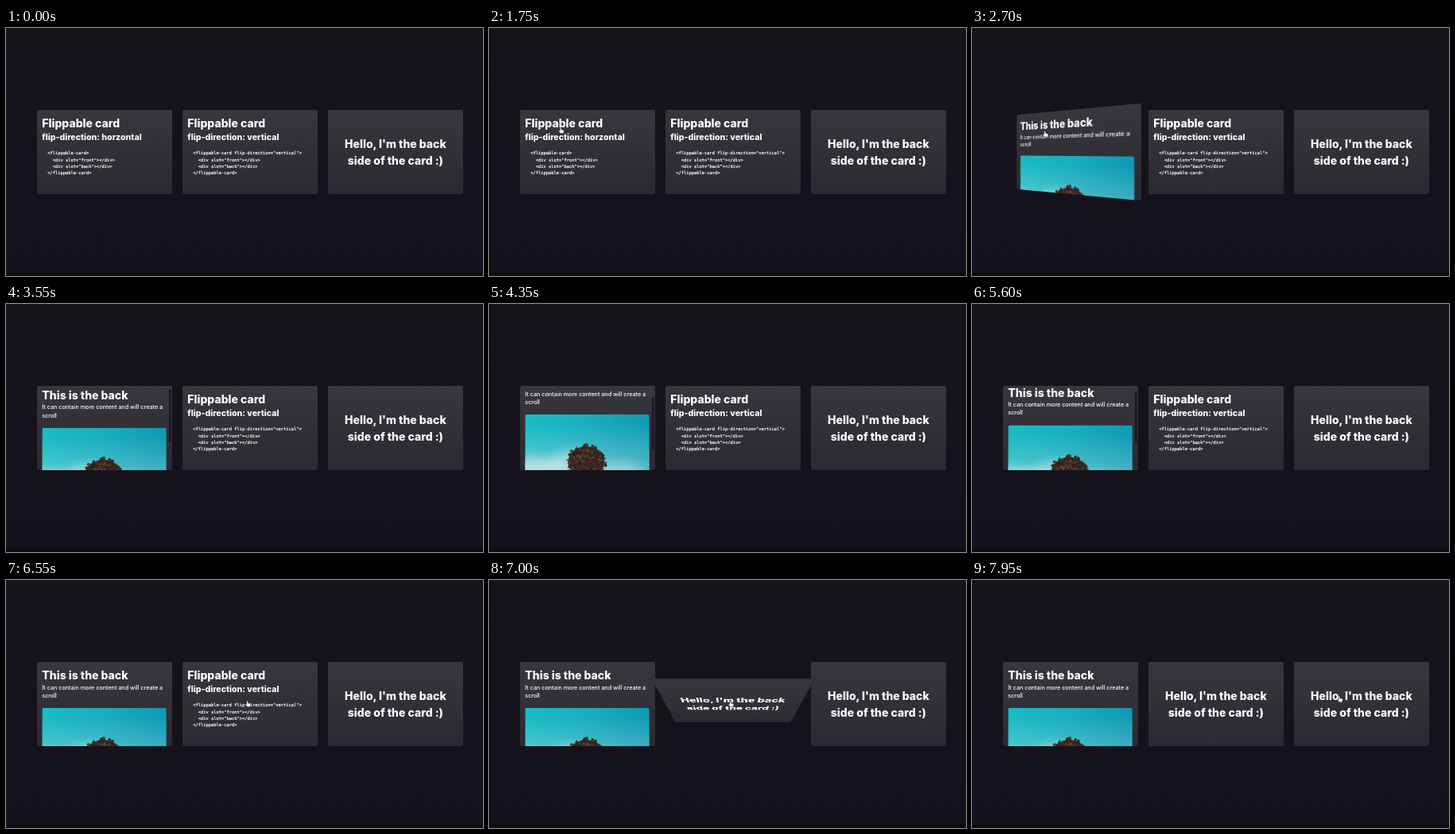
Recreate the animation shown at these times as an HTML page. Size 600 px wide and 312 px high, loop 8000 ms.

```html
<!DOCTYPE html>
<html lang="en">
<head>
<meta charset="utf-8">
<title>Flippable cards</title>
<style>
  html, body { margin: 0; width: 100%; height: 100%; overflow: hidden; background: #16121c; }
  #stage { position: relative; width: 600px; height: 312px; overflow: hidden;
    background: linear-gradient(#17131a, #16121d 97.8%, #0f0a13 98.8%); }
  .card { position: absolute; top: 102.8px; width: 169.8px; height: 106.4px; z-index: 1; }
  .card.under { z-index: 0; }
  .face { position: absolute; inset: 0; overflow: hidden; border-radius: 2.2px;
    background: linear-gradient(#39363d, #2b2931); backface-visibility: hidden; }
  svg { position: absolute; left: 0; top: 0; overflow: visible; }
  text { fill: #fff; font-family: Inter, "Open Sans", sans-serif; }
  .title { font-size: 14px; font-weight: 800; }
  .sub { font-size: 10.6px; font-weight: 800; }
  .body { font-size: 7.2px; font-weight: 500; }
  .code { font: 5.42px "DejaVu Sans Mono", monospace; stroke: #fff; stroke-width: .18; }
  .middle { text-anchor: middle; }
  #cursor { z-index: 2; }
</style>
</head>
<body>
<div id="stage"></div>
<script>
const LOOP = 8000;
const FLIP_TIME = 800;
const PERSPECTIVE = 270;
const CARD = { left: 38.8, pitch: 183.2, width: 169.8, height: 106.4 };

const stage = document.getElementById('stage');
const clamp = v => Math.min(1, Math.max(0, v));

const text = (cls, x, y, content) =>
  `<text class="${cls}" x="${x}" y="${y}">${content.replace(/</g, '&lt;')}</text>`;
const svg = content => `<svg width="${CARD.width}" height="${CARD.height}">${content}</svg>`;

function frontMarkup(direction, attribute) {
  const code = [
    [0, `<flippable-card${attribute}>`],
    [6.5, '<div slot="front"></div>'],
    [6.5, '<div slot="back"></div>'],
    [0, '</flippable-card>']
  ];
  return svg(
    text('title', 6.3, 22.2, 'Flippable card') +
    text('sub', 6.3, 38.4, `flip-direction: ${direction}`) +
    code.map(([indent, line], i) => text('code', 13.2 + indent, 56.4 + i * 8.2, line)).join('')
  );
}

const greeting = svg(
  text('title middle', 84.9, 48.4, "Hello, I'm the back") +
  text('title middle', 84.9, 68.6, 'side of the card :)')
);

function random(seed) {
  return () => (seed = seed * 16807 % 2147483647) / 2147483647;
}

function treeMarkup() {
  const next = random(77);
  const shades = ['#2b1f1d', '#3e2a24', '#53372b', '#35251f', '#644433'];
  let leaves = '';
  for (let i = 0; i < 200; i++) {
    const angle = next() * Math.PI * 2;
    const reach = Math.sqrt(next());
    const x = 77 + Math.cos(angle) * reach * 25;
    const y = 60 + Math.sin(angle) * reach * 22;
    const shade = shades[Math.floor(next() * shades.length)];
    leaves += `<circle cx="${x.toFixed(1)}" cy="${y.toFixed(1)}" r="${(.7 + next() * 1.4).toFixed(1)}" fill="${shade}"/>`;
  }
  return `<path d="M74 72h6l1 28h-9z" fill="#2a201d"/>
    <ellipse cx="77" cy="60" rx="23" ry="20" fill="#38271f"/>${leaves}
    <path d="M0 99q40-5 78-4t78 3v6H0z" fill="#2c2a25"/>`;
}

const skyMarkup = `
  <rect width="156.4" height="104" fill="url(#sky)"/>
  <rect width="156.4" height="104" fill="url(#haze)"/>
  <g filter="url(#soft)" fill="#d3e6e6">
    <ellipse cx="12" cy="68" rx="42" ry="14" opacity=".75"/>
    <ellipse cx="62" cy="60" rx="32" ry="15" opacity=".55"/>
    <ellipse cx="112" cy="72" rx="36" ry="12" opacity=".45"/>
  </g>`;

const backMarkup = svg(`
  <defs>
    <linearGradient id="sky">
      <stop stop-color="#19bcc6"/><stop offset=".5" stop-color="#18aebf"/><stop offset="1" stop-color="#0f99b4"/>
    </linearGradient>
    <linearGradient id="haze" x2="0" y2="1">
      <stop offset=".1" stop-color="#a9dcdc" stop-opacity="0"/><stop offset="1" stop-color="#a9dcdc" stop-opacity=".75"/>
    </linearGradient>
    <filter id="soft" x="-30%" y="-60%" width="160%" height="220%"><feGaussianBlur stdDeviation="6"/></filter>
    <clipPath id="photo"><rect width="156.4" height="104" rx="2.2"/></clipPath>
  </defs>
  <g id="content">
    ${text('title', 6.3, 22.2, 'This is the back')}
    ${text('body', 6.3, 34.7, 'It can contain more content and will create a')}
    ${text('body', 6.3, 44.9, 'scroll')}
    <g transform="translate(6.4 58)" clip-path="url(#photo)">${skyMarkup}${treeMarkup()}</g>
  </g>
  <rect id="thumb" x="166" width="2.6" height="66" rx="1.3" fill="#19181d"/>`);

function addCard(index, faces, under) {
  const card = document.createElement('div');
  card.className = under ? 'card under' : 'card';
  card.style.left = CARD.left + index * CARD.pitch + 'px';
  card.innerHTML = faces.map(face => `<div class="face">${face}</div>`).join('');
  stage.append(card);
  return [...card.children];
}

const flips = [
  { faces: addCard(0, [frontMarkup('horzontal', ''), backMarkup]), axis: 'Y', start: 2250 },
  { faces: addCard(1, [frontMarkup('vertical', ' flip-direction="vertical"'), greeting], true), axis: 'X', start: 6690 }
];
addCard(2, [greeting]);

stage.insertAdjacentHTML('beforeend', `<svg id="cursor" width="600" height="312">
  <path id="arrow" d="M0 0v6.6l1.5-1.4 1.1 2.4 1.1-.5-1.1-2.3h2z" fill="#000" stroke="#ddd" stroke-width=".5"/>
  <path id="hand" d="M-.8 .5q.8-1 1.6 0v2.3l2.8.6q.9.3.7 1.3l-.6 2.8h-4l-2.2-3q.2-1.1 1.7 0z"
    fill="#fff" stroke="#222" stroke-width=".45"/>
</svg>`);

const content = document.getElementById('content');
const thumb = document.getElementById('thumb');
const arrow = document.getElementById('arrow');
const hand = document.getElementById('hand');

// CSS "ease": cubic-bezier(.25, .1, .25, 1), solved by bisection.
function ease(x) {
  if (x <= 0 || x >= 1) return clamp(x);
  let low = 0, high = 1;
  for (let i = 0; i < 24; i++) {
    const u = (low + high) / 2;
    if (.75 * u * (1 - u) + u ** 3 < x) low = u; else high = u;
  }
  const u = low, v = 1 - u;
  return .3 * u * v * v + 3 * u * u * v + u ** 3;
}

// Keys are [time, ...values], joined by straight lines.
function track(keys, t) {
  const i = keys.findIndex(key => key[0] > t);
  if (i === 0) return keys[0].slice(1);
  if (i < 0) return keys[keys.length - 1].slice(1);
  const a = keys[i - 1], b = keys[i];
  const k = (t - a[0]) / (b[0] - a[0]);
  return a.slice(1).map((v, n) => v + (b[n + 1] - v) * k);
}

const scrollKeys = [[3300, 0], [4350, 22], [4900, 64], [5100, 64], [5600, 8.5], [5750, 0]];
const thumbKeys = [[3200, 0], [3350, 1], [6000, 1], [6250, 0]];
const cursorKeys = [
  [1100, 1, 56], [1250, 19.5, 65], [1550, 19.5, 65], [1750, 90, 125], [1900, 91.5, 129.5],
  [2900, 91.5, 129.5], [3100, 122, 185], [5850, 122, 185], [6250, 303.5, 152],
  [7550, 303.5, 152], [7900, 462, 146]
];

function drawCursor(t) {
  const visible = t >= 1100 && (t < 3050 || t >= 5850);
  const [x, y] = track(cursorKeys, t);
  const offset = x - CARD.left;
  const overCard = offset > 0 && offset % CARD.pitch < CARD.width;
  for (const shape of [arrow, hand]) {
    shape.setAttribute('transform', `translate(${x} ${y})`);
    shape.style.display = visible && (shape === hand) === overCard ? '' : 'none';
  }
}

function draw(t) {
  for (const { faces, axis, start } of flips) {
    const angle = 180 * ease((t - start) / FLIP_TIME);
    faces.forEach((face, side) => {
      const turn = (angle + side * 180) % 360;
      face.style.transform = turn ? `perspective(${PERSPECTIVE}px) rotate${axis}(${turn}deg)` : 'none';
      face.style.visibility = (angle < 90) === (side === 0) ? 'visible' : 'hidden';
    });
  }
  const [scroll] = track(scrollKeys, t);
  content.setAttribute('transform', `translate(0 ${-scroll})`);
  thumb.setAttribute('y', 1 + scroll * .62);
  thumb.setAttribute('opacity', track(thumbKeys, t)[0]);
  drawCursor(t);
}

const began = performance.now();
function tick() {
  draw((performance.now() - began) % LOOP);
  requestAnimationFrame(tick);
}
tick();
</script>
</body>
</html>
```
